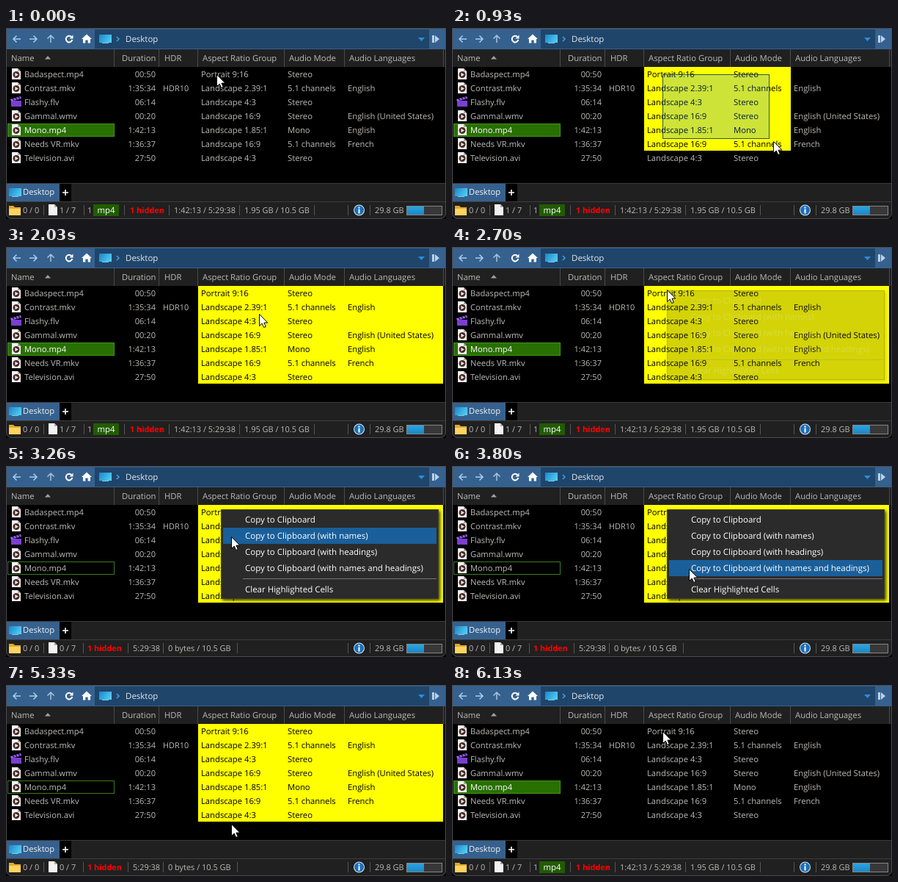
Recreate the animation shown at these times as an HTML page with a canvas. Size 600x260 px, loop 6.16 s.

```html
<!DOCTYPE html>
<html lang="en">
<head>
<meta charset="utf-8">
<title>Cell highlighting</title>
<style>
html, body { margin: 0; width: 100%; height: 100%; overflow: hidden; background: #000; }
canvas { display: block; }
</style>
</head>
<body>
<canvas id="stage" width="600" height="260"></canvas>
<script>
const ctx = document.getElementById('stage').getContext('2d');
const LOOP = 6160;
const TIME = { press: 260, drag: 530, release: 1660, menuIn: 2660, deselect: 2760,
  menuOut: 5090, clear: 5400 };
const FADE = 200, LAG = 23;

const HOME = [288, 64];
const LEGS = [
  { from: 530, to: 1460, at: [497, 190], ease: ease },
  { from: 1650, to: 2500, at: [294, 59], ease: ease },
  { from: 2996, to: 3960, at: [324, 142], ease: ease },
  { from: 4725, to: 5060, at: [308, 190], ease: ease },
  { from: 5440, to: 6140, at: HOME, ease: inOut },
];

const COLUMNS = [[262, 380], [380, 462], [462, 596]];
const ROW_TOP = 53, ROW_H = 19, LIST_TEXT = '#bcbab8';
const FILES = [
  ['Badaspect.mp4', '00:50', '', 'Portrait 9:16', 'Stereo', ''],
  ['Contrast.mkv', '1:35:34', 'HDR10', 'Landscape 2.39:1', '5.1 channels', 'English'],
  ['Flashy.flv', '06:14', '', 'Landscape 4:3', 'Stereo', ''],
  ['Gammal.wmv', '00:20', '', 'Landscape 16:9', 'Stereo', 'English (United States)'],
  ['Mono.mp4', '1:42:13', '', 'Landscape 1.85:1', 'Mono', 'English'],
  ['Needs VR.mkv', '1:36:37', '', 'Landscape 16:9', '5.1 channels', 'French'],
  ['Television.avi', '27:50', '', 'Landscape 4:3', 'Stereo', ''],
];
const MENU = [
  ['Copy to Clipboard', 62],
  ['Copy to Clipboard (with names)', 84],
  ['Copy to Clipboard (with headings)', 106],
  ['Copy to Clipboard (with names and headings)', 128],
  ['Clear Highlighted Cells', 157],
];

// Same curve as the CSS "ease" keyword
function ease(p) {
  const bezier = (s, a, b) => 3 * (1 - s) ** 2 * s * a + 3 * (1 - s) * s * s * b + s ** 3;
  let low = 0, high = 1;
  for (let i = 0; i < 20; i++) {
    const mid = (low + high) / 2;
    if (bezier(mid, .25, .25) < p) low = mid; else high = mid;
  }
  return bezier(low, .1, 1);
}
function inOut(p) { return p < .5 ? 2 * p * p : 1 - 2 * (1 - p) ** 2; }
function clamp(v) { return Math.max(0, Math.min(1, v)); }

function pointer(t) {
  let [x, y] = HOME;
  for (const leg of LEGS) {
    if (t < leg.from) break;
    const p = t >= leg.to ? 1 : leg.ease((t - leg.from) / (leg.to - leg.from));
    x += (leg.at[0] - x) * p;
    y += (leg.at[1] - y) * p;
  }
  return [Math.round(x), Math.round(y)];
}

function box(x, y, w, h, color) {
  ctx.fillStyle = color;
  ctx.fillRect(x, y, w, h);
}
function frame(x, y, w, h, color) {
  ctx.strokeStyle = color;
  ctx.lineWidth = 1;
  ctx.strokeRect(x + .5, y + .5, w - 1, h - 1);
}
function shade(x, y, w, h, top, bottom) {
  const g = ctx.createLinearGradient(0, y, 0, y + h);
  g.addColorStop(0, top);
  g.addColorStop(1, bottom);
  box(x, y, w, h, g);
}
function text(str, x, y, size, color = LIST_TEXT, align = 'left', weight = 400) {
  ctx.font = `${weight} ${size}px "Open Sans", "Noto Sans", sans-serif`;
  ctx.textAlign = align;
  ctx.fillStyle = color;
  ctx.fillText(str, x, y);
}
function shape(d, fill, stroke, width = 1, x = 0, y = 0) {
  const path = new Path2D(d);
  ctx.save();
  ctx.translate(x, y);
  if (fill) { ctx.fillStyle = fill; ctx.fill(path); }
  if (stroke) { ctx.strokeStyle = stroke; ctx.lineWidth = width; ctx.stroke(path); }
  ctx.restore();
}
function disc(x, y, r, color) {
  ctx.fillStyle = color;
  ctx.beginPath();
  ctx.arc(x, y, r, 0, 7);
  ctx.fill();
}

function monitor(x, y) {
  const g = ctx.createLinearGradient(x, y, x + 16, y + 11);
  g.addColorStop(0, '#1b86c8');
  g.addColorStop(1, '#56d0f6');
  box(x, y, 17, 11, g);
  box(x + 4, y + 11, 9, 1, '#7cc4e6');
}
function page(x, y, h = 15) {
  shape(`M0 0H8L12 4V${h}H0Z`, '#f2f2f2', null, 1, x, y);
  shape('M8 0V4H12Z', '#a9a9a9', null, 1, x, y);
}
function videoIcon(y) {
  page(8, y + 2);
  disc(14, y + 10.5, 4.5, '#4a2a25');
  shape('M12.5 8L16.8 10.5L12.5 13Z', '#fff', null, 1, 0, y);
}
function clapperIcon(y) {
  box(7, y + 8, 14, 8, '#7a3fd0');
  shape('M6 6L20 2L21 5L7 9Z', '#9a63ea', null, 1, 0, y);
  shape('M9 5L11 7.5M13 4L15 6.5M17 3L19 5.5', null, '#2a1060', 1.4, 0, y);
}

function toolbar() {
  box(0, 0, 600, 29, '#36618e');
  box(121, 2, 456, 26, '#1f456b');
  shape('M20 15H10M14.5 10.5L10 15L14.5 19.5', null, '#a8cdf0', 1.5);
  shape('M32 15H42M37.5 10.5L42 15L37.5 19.5', null, '#a8cdf0', 1.5);
  shape('M61 20V10M56.5 14.5L61 10L65.5 14.5', null, '#a8c4de', 1.5);
  shape('M89.5 12.5A4.3 4.3 0 1 0 90.3 16', null, '#fff', 2);
  shape('M91.5 9.5V14.5H86.5Z', '#fff');
  shape('M110 8.5L117 15H115V20.5H111.7V16.5H108.3V20.5H105V15H103Z', '#fff');
  monitor(127, 9);
  shape('M151 12L154 15L151 18', null, '#3d9de0', 1.6);
  text('Desktop', 163, 19, 11.5, '#e2e6ea');
  shape('M562 13H571L566.5 18Z', '#2e8cd8');
  shape('M581 10H584V20H581ZM585 10L591 15L585 20Z', '#b9d3ea');
}

function header() {
  box(0, 29, 600, 24, '#202020');
  [[148, 'Duration', 158], [209, 'HDR', 216], [262, 'Aspect Ratio Group', 268],
    [380, 'Audio Mode', 386], [462, 'Audio Languages', 468]].forEach(([line, label, x]) => {
    box(line - 1, 29, 1, 24, '#4a4a4a');
    text(label, x, 45, 11.3);
  });
  box(596, 29, 1, 24, '#4a4a4a');
  text('Name', 7, 45, 11.3);
  shape('M53 42.5L57 38L61 42.5Z', '#a0a0a0');
}

function fileList(highlight, selected) {
  box(0, 53, 600, 158, '#000');
  if (selected) box(2, 130, 146, 18, '#287000');
  frame(2, 130, 146, 18, selected ? '#439420' : '#3c7a20');
  FILES.forEach(([name, duration, hdr, ...cells], row) => {
    const top = ROW_TOP + row * ROW_H, base = top + 14;
    if (name.endsWith('.flv')) clapperIcon(top); else videoIcon(top);
    text(name, 25, base, 11.2, selected && row === 4 ? '#fff' : LIST_TEXT);
    text(duration, 204, base, 11.1, LIST_TEXT, 'right');
    text(hdr, 214, base, 10.9);
    cells.forEach((cell, i) => {
      const [left, right] = COLUMNS[i];
      const lit = highlight && left + 16 < highlight[0] && top < highlight[1];
      if (lit) box(left, top, right - left, ROW_H, '#ff0');
      text(cell, left + 4, base, 11.25, lit ? '#000' : LIST_TEXT);
    });
  });
}

function tabs() {
  box(0, 211, 600, 25, '#202020');
  box(0, 211, 600, 1, '#3a3a3a');
  box(0, 212, 73, 24, '#36618e');
  monitor(4, 218);
  text('Desktop', 23, 227, 11.2, '#f0f2f4');
  box(73, 212, 16, 24, '#000');
  shape('M77 224H85M81 220V228', null, '#fff', 1.6);
}

function statusBar(selected) {
  const size = 10.95, base = 252;
  const item = (str, x, color) => text(str, x, base, size, color);
  const separator = x => box(x, 241, 1, 14, '#565656');
  box(0, 236, 600, 24, '#202020');
  box(0, 236, 600, 1, '#3c3c3c');
  shape('M4 242H10L12 244H20V255H4Z', '#e0a92c');
  shape('M4 246H20V255H4Z', '#ffd45e');
  item('0 / 0', 23);
  separator(51);
  page(58, 240);
  if (selected) {
    item('1 / 7', 73);
    separator(106);
    item('1', 111);
    box(119, 240, 35, 16, '#215c00');
    text('mp4', 136.5, base, 11.4, '#fff', 'center');
    separator(161);
    text('1 hidden', 169, base, 10.9, '#f00', 'left', 700);
    separator(222);
    item('1:42:13 / 5:29:38', 229);
    separator(318);
    item('1.95 GB / 10.5 GB', 325);
    separator(420);
  } else {
    item('0 / 7', 73);
    separator(105);
    text('1 hidden', 111, base, 10.9, '#f00', 'left', 700);
    separator(166);
    item('5:29:38', 173);
    separator(214);
    item('0 bytes / 10.5 GB', 221);
    separator(315);
  }
  separator(466);
  disc(481.5, 248, 7.5, '#d5e6f4');
  disc(481.5, 248, 6.5, '#1c6fb8');
  box(480.5, 246.5, 2, 6, '#fff');
  box(480.5, 243.5, 2, 2, '#fff');
  separator(496);
  item('29.8 GB', 503);
  box(546, 242, 49, 13, '#383838');
  shade(547, 243, 23, 11, '#2ba4e2', '#1c86c4');
  frame(546, 242, 49, 13, '#858585');
}

function marquee([x, y]) {
  const w = x - HOME[0] + 1, h = y - HOME[1] + 1;
  if (w < 2 || h < 2) return;
  box(287, 63, w, h, 'rgba(30,130,255,.22)');
  frame(287, 63, w, h, 'rgba(0,40,95,.75)');
}

function menuShadow(x, y, w, h) {
  ctx.save();
  ctx.beginPath();
  ctx.rect(0, 0, 600, 260);
  ctx.rect(x, y, w, h);
  ctx.clip('evenodd');
  ctx.shadowColor = 'rgba(0,0,0,.75)';
  ctx.shadowBlur = 4;
  ctx.shadowOffsetX = ctx.shadowOffsetY = 2;
  box(x, y, w, h, '#000');
  ctx.restore();
}

function contextMenu(alpha, [x, y]) {
  if (alpha <= 0) return;
  ctx.save();
  ctx.globalAlpha = alpha;
  menuShadow(293, 59, 297, 122);
  box(293, 59, 297, 122, '#2b2b2b');
  frame(293, 59, 297, 122, '#3e3e3e');
  box(323, 153, 264, 1, '#777');
  for (const [label, top] of MENU) {
    if (x >= 293 && y >= top && y < top + 22) box(296, top, 291, 22, '#1a5f9a');
    text(label, 326, top + 15, 11.5, '#fff');
  }
  ctx.restore();
}

function arrow([x, y]) {
  shape('M0 0V16L3.7 12.6L6.2 18L8.8 16.9L6.4 11.6H11.3Z', '#fff', '#000', 1, x - .5, y - .5);
}

function windowBorder() {
  shape('M0 252V260H8A8 8 0 0 1 0 252ZM600 252V260H592A8 8 0 0 0 600 252Z', '#000');
  ctx.strokeStyle = '#4c4c4c';
  ctx.lineWidth = 1;
  ctx.beginPath();
  ctx.roundRect(.5, .5, 599, 259, [0, 0, 7, 7]);
  ctx.stroke();
}

function draw(t) {
  const cursor = pointer(t);
  const dragEnd = pointer(Math.min(t - LAG, 1460));
  const selected = t < TIME.deselect || t >= TIME.clear;
  const highlighted = t >= TIME.press && t < TIME.clear;

  toolbar();
  header();
  fileList(highlighted && dragEnd, selected);
  tabs();
  statusBar(selected);
  windowBorder();
  if (t >= TIME.drag && t < TIME.release) marquee(dragEnd);
  contextMenu(clamp((t - TIME.menuIn) / FADE) - clamp((t - TIME.menuOut) / FADE), cursor);
  arrow(cursor);
}

ctx.textRendering = 'geometricPrecision';
const start = performance.now();
function tick() {
  draw((performance.now() - start) % LOOP);
  requestAnimationFrame(tick);
}
tick();
</script>
</body>
</html>
```
